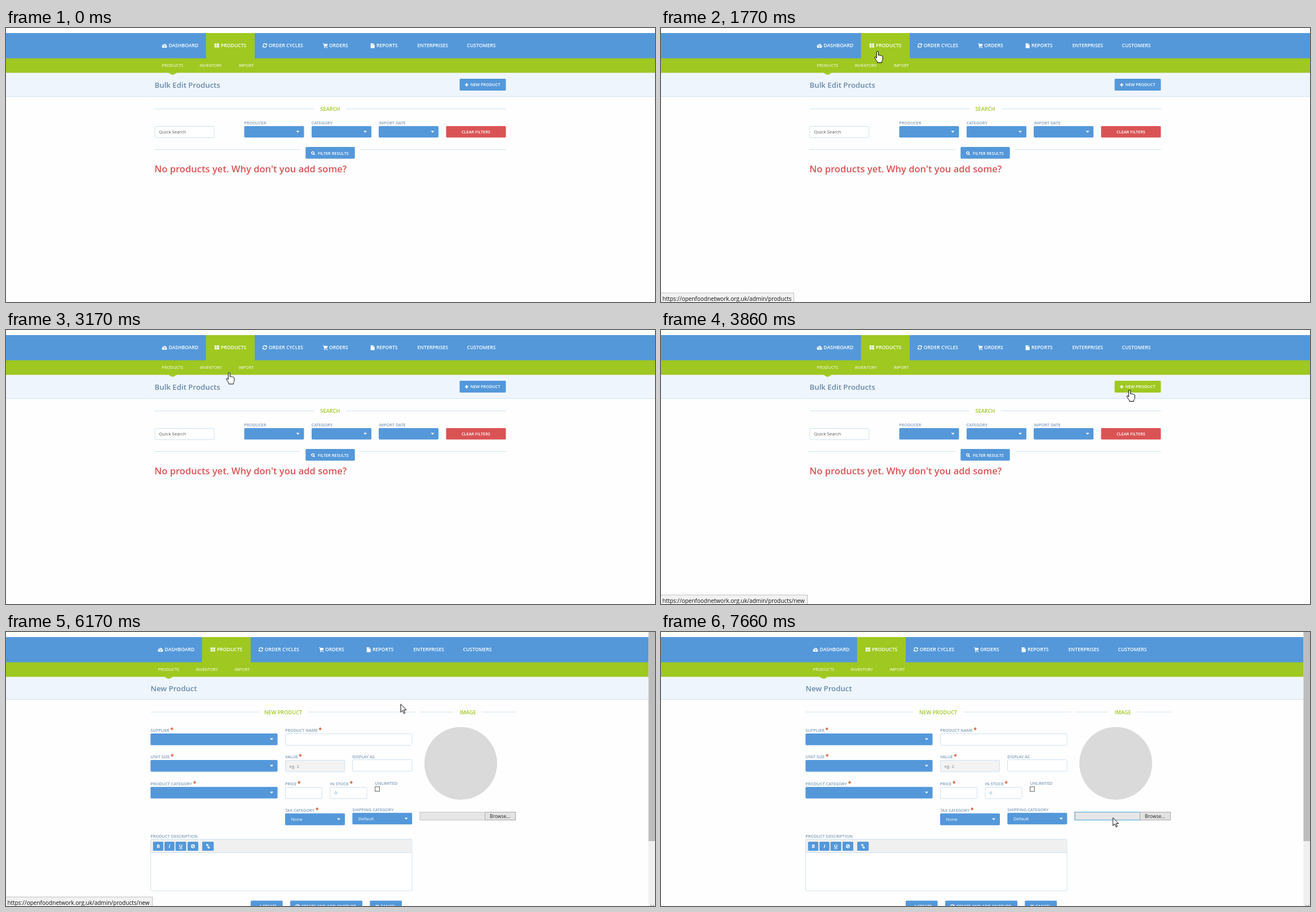
These frames come from a looping animation (1151 by 486 pixels, 8000 ms). An HTML page:

```html
<!DOCTYPE html>
<html lang="en">
<head>
<meta charset="utf-8">
<title>Adding a product</title>
<style>
  html, body { margin: 0; width: 100%; height: 100%; overflow: hidden; background: #fefefe; }
  svg { display: block; }
  text { font-family: "Open Sans", "Noto Sans", sans-serif; white-space: pre; }

  .blue { fill: #5498da; }
  .green { fill: #9fc820; }
  .red { fill: #da5354; }
  .white { fill: #fff; }
  .nav { font-size: 8.62px; font-weight: 600; fill: #fff; }
  .sub { font-size: 7.3px; fill: #fff; }
  .title { font-size: 13.26px; font-weight: 600; fill: #6788a9; }
  .legend { font-size: 9.28px; font-weight: 600; fill: #9fc820; text-anchor: middle; }
  .label { font-size: 7.3px; font-weight: 600; fill: #7d9bb9; }
  .label tspan { font-size: 10px; font-weight: 700; fill: #d4501e; }
  .btn { font-size: 7.3px; font-weight: 600; fill: #fff; }
  .value { font-size: 7.96px; fill: #555; }
  .tool { font: 700 8.5px "Noto Serif", serif; fill: #fff; text-anchor: middle; }
  .rule { stroke: #cee1f4; fill: none; }
  .field { fill: #fff; stroke: #cee1f4; }
  .line { fill: none; stroke: #fff; stroke-width: 1.3; }
  .url { font-size: 10.03px; fill: #111; }
  .panel { fill: #f2f2f2; stroke: #bdbdbd; }

  /* 1% of the loop is 80 ms */
  .on { opacity: 0; animation: 8s step-end infinite; }
  #chrome { animation: chrome 8s step-end infinite; }
  #list { animation: list 8s step-end infinite; }
  #form { animation-name: form; }
  #add { animation: add 8s step-end infinite; }
  #hover { animation-name: hover; }
  #toImport { animation-name: toImport; }
  #toProducts { animation-name: toProducts; }
  #toInventory { animation-name: toInventory; }
  #toNew { animation-name: toNew; }
  #focus { animation-name: focus; }
  #arrow { animation-name: arrow; }
  #hand { animation-name: hand; }
  #cursor { animation: move 8s infinite; }

  @keyframes chrome { 0% { transform: none } 66.625%, 100% { transform: translateX(-7px) } }
  @keyframes list { 0% { opacity: 1 } 66.625%, 100% { opacity: 0 } }
  @keyframes form { 0% { opacity: 0 } 66.625%, 100% { opacity: 1 } }
  @keyframes add {
    0% { fill: #5498da } 45.375% { fill: #9fc820 }
    58.75% { fill: #93b81e } 61.875%, 100% { fill: #9fc820 }
  }
  @keyframes hover { 0% { opacity: 0 } 12.5% { opacity: 1 } 14.5%, 100% { opacity: 0 } }
  @keyframes toImport {
    0% { opacity: 0 } 13.375% { opacity: .22 } 14.5% { opacity: 1 } 15.5%, 100% { opacity: 0 }
  }
  @keyframes toProducts {
    0% { opacity: 0 } 15.5% { opacity: 1 } 24.1% { opacity: 0 }
    26% { opacity: 1 } 39.5% { opacity: 0 } 100% { opacity: 0 }
  }
  @keyframes toInventory { 0% { opacity: 0 } 24.1% { opacity: 1 } 26%, 100% { opacity: 0 } }
  @keyframes toNew {
    0% { opacity: 0 } 46.375% { opacity: 1 } 78.125% { opacity: .22 } 79.125%, 100% { opacity: 0 }
  }
  @keyframes focus { 0% { opacity: 0 } 92.75%, 100% { opacity: 1 } }
  @keyframes arrow {
    0% { opacity: 0 } 8.625% { opacity: 1 } 12.5% { opacity: 0 }
    40.625% { opacity: 1 } 45.375% { opacity: 0 } 65.625%, 100% { opacity: 1 }
  }
  @keyframes hand {
    0% { opacity: 0 } 12.5% { opacity: 1 } 40.625% { opacity: 0 }
    45.375% { opacity: 1 } 65.625%, 100% { opacity: 0 }
  }
  @keyframes move {
    0% { transform: translate(1000px, 230px); animation-timing-function: step-end }
    8.625% { transform: translate(1000px, 230px); animation-timing-function: steps(2) }
    10.625% { transform: translate(640px, 110px); animation-timing-function: steps(2) }
    12.5% { transform: translate(437px, 68px); animation-timing-function: step-end }
    13.375% { transform: translate(403px, 63px); animation-timing-function: steps(4) }
    17.375% { transform: translate(393px, 37px); animation-timing-function: step-end }
    22.125% { transform: translate(384px, 41px); animation-timing-function: steps(3) }
    25% { transform: translate(327px, 58px); animation-timing-function: steps(4) }
    28.875% { transform: translate(301px, 64px); animation-timing-function: step-end }
    37.625% { transform: translate(307px, 66px); animation-timing-function: steps(3) }
    40.625% { transform: translate(440px, 80px); animation-timing-function: steps(5) }
    45.375% { transform: translate(806px, 104px); animation-timing-function: steps(2) }
    47.25% { transform: translate(827px, 106px); animation-timing-function: step-end }
    48.25% { transform: translate(831px, 106px); animation-timing-function: step-end }
    77.125% { transform: translate(700px, 127.5px); animation-timing-function: steps(4) }
    81.125% { transform: translate(706px, 222px); animation-timing-function: steps(6) }
    86.875% { transform: translate(776px, 292px); animation-timing-function: step-end }
    87.875% { transform: translate(778px, 296px); animation-timing-function: steps(8) }
    95.75%, 100% { transform: translate(801.5px, 329px); animation-timing-function: step-end }
  }
</style>
</head>
<body>
<svg width="1151" height="486" viewBox="0 0 1151 486">
  <defs>
    <path id="caret" class="white" d="M-3-1.5H3L0 1.8z"/>
    <path id="notch" class="green" d="M-8 0H8L2 3.2Q0 4-2 3.2z"/>
    <g id="refresh" class="line">
      <path d="M-3.2-.7A3.2 3.2 0 0 1 2.4-2.1M3.2.7A3.2 3.2 0 0 1-2.4 2.1"/>
      <path class="white" stroke="none" d="M4-4V-.6H.6zM-4 4V.6H-.6z"/>
    </g>
  </defs>

  <rect width="1151" height="486" fill="#fefefe"/>

  <g id="list">
    <rect y="79" width="1151" height="42.5" fill="#eff5fc"/>
    <path class="rule" d="M0 121.5H1151M263.5 143.5H547M603 143.5H887M263.5 215.5H522M628 215.5H887"/>
    <text class="title" x="263.5" y="105.8">Bulk Edit Products</text>
    <rect id="add" x="804.5" y="90" width="82" height="21" rx="1.7"/>
    <path class="line" style="stroke-width:1.8" d="M814 100.7h6M817 97.7v6"/>
    <text class="btn" x="823.5" y="103.4">NEW PRODUCT</text>

    <text class="legend" x="575" y="147.4">SEARCH</text>
    <rect class="field" x="264" y="174.5" width="105" height="20" rx="1.5"/>
    <text class="value" x="271.3" y="187.3">Quick Search</text>
    <text class="label" x="422.3" y="171.4">PRODUCER</text>
    <text class="label" x="541.8" y="171.4">CATEGORY</text>
    <text class="label" x="661" y="171.4">IMPORT DATE</text>
    <g class="blue">
      <rect x="422.5" y="174" width="106" height="20.3" rx="1.7"/>
      <rect x="542" y="174" width="106" height="20.3" rx="1.7"/>
      <rect x="661" y="174" width="106" height="20.3" rx="1.7"/>
      <rect x="531.3" y="211" width="87.4" height="20.7" rx="1.7"/>
    </g>
    <use href="#caret" x="517.5" y="184"/>
    <use href="#caret" x="637" y="184"/>
    <use href="#caret" x="756.5" y="184"/>
    <rect class="red" x="780.5" y="174" width="106" height="20.3" rx="1.7"/>
    <text class="btn" x="808" y="187">CLEAR FILTERS</text>
    <g class="line"><circle cx="544.2" cy="221.6" r="2.2"/><path d="M545.8 223.3l2 2"/></g>
    <text class="btn" x="553" y="224.6">FILTER RESULTS</text>
    <text class="red" x="263.3" y="256.2" font-size="16.58" font-weight="600">No products yet. Why don't you add some?</text>
  </g>

  <g id="form" class="on">
    <rect y="79" width="1151" height="40.5" fill="#eff5fc"/>
    <path class="rule" d="M0 119.5H1140M256.5 142H448M536 142H727M734 142H794M844 142H904"/>
    <text class="title" x="256.5" y="105">New Product</text>
    <text class="legend" x="491.7" y="145.6">NEW PRODUCT</text>
    <text class="legend" x="819" y="145.6">IMAGE</text>

    <g class="label">
      <text x="256.3" y="177">SUPPLIER <tspan>*</tspan></text>
      <text x="495" y="177">PRODUCT NAME <tspan>*</tspan></text>
      <text x="256.3" y="224.4">UNIT SIZE <tspan>*</tspan></text>
      <text x="495" y="224.2">VALUE <tspan>*</tspan></text>
      <text x="614.3" y="223.6">DISPLAY AS</text>
      <text x="256.3" y="272">PRODUCT CATEGORY <tspan>*</tspan></text>
      <text x="495" y="272">PRICE <tspan>*</tspan></text>
      <text x="574.7" y="272">IN STOCK <tspan>*</tspan></text>
      <text x="654.3" y="271.3">UNLIMITED</text>
      <text x="495" y="318.7">TAX CATEGORY <tspan>*</tspan></text>
      <text x="614.3" y="318.2">SHIPPING CATEGORY</text>
      <text x="256.3" y="364.8">PRODUCT DESCRIPTION</text>
    </g>

    <g class="blue">
      <rect x="256.3" y="180" width="225.3" height="20.7" rx="1.7"/>
      <rect x="256.3" y="227" width="225.3" height="20.7" rx="1.7"/>
      <rect x="256.3" y="274.7" width="225.3" height="20.5" rx="1.7"/>
      <rect x="495" y="321.7" width="106" height="21" rx="1.7"/>
      <rect x="614.3" y="320.7" width="106" height="20.5" rx="1.7"/>
    </g>
    <use href="#caret" x="471" y="190"/>
    <use href="#caret" x="471" y="237.3"/>
    <use href="#caret" x="471" y="284.7"/>
    <use href="#caret" x="590" y="332"/>
    <use href="#caret" x="709.7" y="331"/>
    <g class="field">
      <rect x="495.5" y="180.5" width="224.5" height="20.5" rx="1.5"/>
      <rect x="495.5" y="227.5" width="105" height="20.3" rx="1.5" fill="#f3f3f3"/>
      <rect x="614.5" y="226.5" width="105.5" height="20.5" rx="1.5"/>
      <rect x="495.5" y="275.5" width="65" height="20" rx="1.5"/>
      <rect x="575" y="275.5" width="65" height="20" rx="1.5"/>
    </g>
    <rect x="654.5" y="274.5" width="8" height="8" fill="#fff" stroke="#666"/>
    <text class="value" x="502.5" y="241" style="fill:#888">eg. 2</text>
    <text class="value" x="582.8" y="288.2" style="fill:#5498da">0</text>
    <text class="value" x="505.5" y="335" style="fill:#fff">None</text>
    <text class="value" x="625" y="334" style="fill:#fff">Default</text>

    <circle cx="806.5" cy="233" r="64.5" fill="#dadada"/>
    <rect x="734" y="319.5" width="116" height="14" fill="#e6e6e6" stroke="#c4c4c4"/>
    <rect id="focus" class="on" x="734" y="319.5" width="115.5" height="14" fill="none" stroke="#4ba3dc"/>
    <rect x="849.5" y="319.5" width="54" height="14" fill="#e2e2e2" stroke="#a9a9a9"/>
    <text x="858" y="329.7" font-size="8.5" fill="#222">Browse...</text>

    <rect class="field" x="256.5" y="367.5" width="463.5" height="91.5" rx="1.5"/>
    <path d="M257 368H719.5V391.5H257z" fill="#f0f0f0"/>
    <path class="rule" d="M257 391.5H720"/>
    <g class="blue">
      <rect x="260.8" y="372" width="18.2" height="16" rx="1.5"/>
      <rect x="281" y="372" width="17.7" height="16" rx="1.5"/>
      <rect x="300.6" y="372" width="19" height="16" rx="1.5"/>
      <rect x="322" y="372" width="19" height="16" rx="1.5"/>
      <rect x="348" y="372" width="20.4" height="16" rx="1.5"/>
      <rect x="434" y="476.5" width="56.6" height="21" rx="1.7"/>
      <rect x="504" y="476.5" width="128" height="21" rx="1.7"/>
      <rect x="645.3" y="476.5" width="56.7" height="21" rx="1.7"/>
    </g>
    <g class="tool">
      <text x="270" y="383">B</text>
      <text x="289.8" y="383" font-style="italic">I</text>
      <text x="310" y="383" text-decoration="underline">U</text>
    </g>
    <g class="line">
      <circle cx="331.5" cy="380" r="2.8"/><path d="M329.6 382l3.8-4"/>
      <path d="M357.7 380l-1.8-1.8q-.7-1.7 1.2-1.5l2 2M358.7 380l1.8 1.8q.7 1.7-1.2 1.5l-2-2"/>
      <path d="M446 486.5l2 2 4-4M655.7 484l5 5M660.7 484l-5 5"/>
    </g>
    <use href="#refresh" x="516.5" y="487"/>
    <g class="btn">
      <text x="454.5" y="489.3">CREATE</text>
      <text x="523.5" y="489.3">CREATE AND ADD ANOTHER</text>
      <text x="664" y="489.3">CANCEL</text>
    </g>
    <text class="value" x="493.3" y="490">or</text>
    <text class="value" x="634.7" y="490">or</text>
  </g>

  <g id="chrome">
    <path class="blue" d="M0 9H1160V54H0z"/>
    <path class="green" d="M0 53.7H1160V79.5H0zM354.7 9H441V54H354.7z"/>
    <use href="#notch" x="295.5" y="79.3"/>
    <g id="hover" class="on"><use href="#notch" x="425.5" y="79.3"/></g>
    <path class="white" d="M277.2 35a4.4 4.4 0 1 1 7.6 0z"/>
    <path class="blue" d="M280.3 33.8l1.1-3.8 .6.2-.4 3.8zM278 31h1.3v1.2H278zM282.8 31h1.3v1.2h-1.3zM279.3 28.8h1.2V30h-1.2z"/>
    <path class="white" d="M369.8 27.5h3.7v3.2h-3.7zM374.3 27.5h3.7v3.2h-3.7zM369.8 31.4h3.7v3.2h-3.7zM374.3 31.4h3.7v3.2h-3.7z"/>
    <use href="#refresh" x="459" y="31"/>
    <path class="white" d="M562 27.3h2l.4 1h6l-.6 3.5-4.8.6.2.6h4.6v.8h-5.4l-1.2-5.7H562z"/>
    <circle class="white" cx="565.2" cy="34.8" r=".9"/>
    <circle class="white" cx="569.2" cy="34.8" r=".9"/>
    <path class="white" d="M646.7 27h3.8v3h3.2v5.8h-7zM651.2 27l2.5 2.4h-2.5z"/>
    <g class="nav">
      <text x="288.5" y="34.2">DASHBOARD</text>
      <text x="381" y="34.2">PRODUCTS</text>
      <text x="465.8" y="34.2">ORDER CYCLES</text>
      <text x="573" y="34.2">ORDERS</text>
      <text x="657" y="34.2">REPORTS</text>
      <text x="729.5" y="34.2">ENTERPRISES</text>
      <text x="817.5" y="34.2">CUSTOMERS</text>
    </g>
    <g class="sub">
      <text x="276.5" y="69">PRODUCTS</text>
      <text x="343.3" y="69">INVENTORY</text>
      <text x="412.2" y="69">IMPORT</text>
    </g>
  </g>

  <g id="form" class="on" style="animation-name:form">
    <rect x="1139.5" width="11.5" height="486" fill="#f0f0f0"/>
    <rect x="1139.5" width="11.5" height="371" fill="#bdbdbd"/>
    <path d="M1143 484l3 3 3-3" fill="none" stroke="#666"/>
  </g>

  <g class="url">
    <g id="toImport" class="on">
      <rect class="panel" x="-1" y="470" width="268.5" height="20"/>
      <text x="2.5" y="484">https://openfoodnetwork.org.uk/admin/product_import</text>
    </g>
    <g id="toProducts" class="on">
      <rect class="panel" x="-1" y="470" width="236.5" height="20"/>
      <text x="2.5" y="484">https://openfoodnetwork.org.uk/admin/products</text>
    </g>
    <g id="toInventory" class="on">
      <rect class="panel" x="-1" y="470" width="239.5" height="20"/>
      <text x="2.5" y="484">https://openfoodnetwork.org.uk/admin/inventory</text>
    </g>
    <g id="toNew" class="on">
      <rect class="panel" x="-1" y="470" width="260.5" height="20"/>
      <text x="2.5" y="484">https://openfoodnetwork.org.uk/admin/products/new</text>
    </g>
  </g>

  <g id="cursor" fill="#fff" stroke="#000">
    <path id="arrow" class="on" d="M0 .5V14.6L3.3 11.5 5.6 17 7.8 16 5.5 10.7H10z"/>
    <path id="hand" class="on" stroke-linejoin="round" d="M-1.6 12.6V2a1.6 1.6 0 0 1 3.2 0V7.6c.5-1 2.6-.9 2.9.4 .6-.8 2.3-.6 2.6.6 .8-.5 2.1 0 2.1 1.4V14c0 2-1.3 3.3-1.6 4.6V20.5H-.4V18.8C-1.8 17-3.4 14.8-4.8 12.2c-.7-1.4.8-2.4 1.8-1.5z"/>
  </g>
</svg>
</body>
</html>
```
